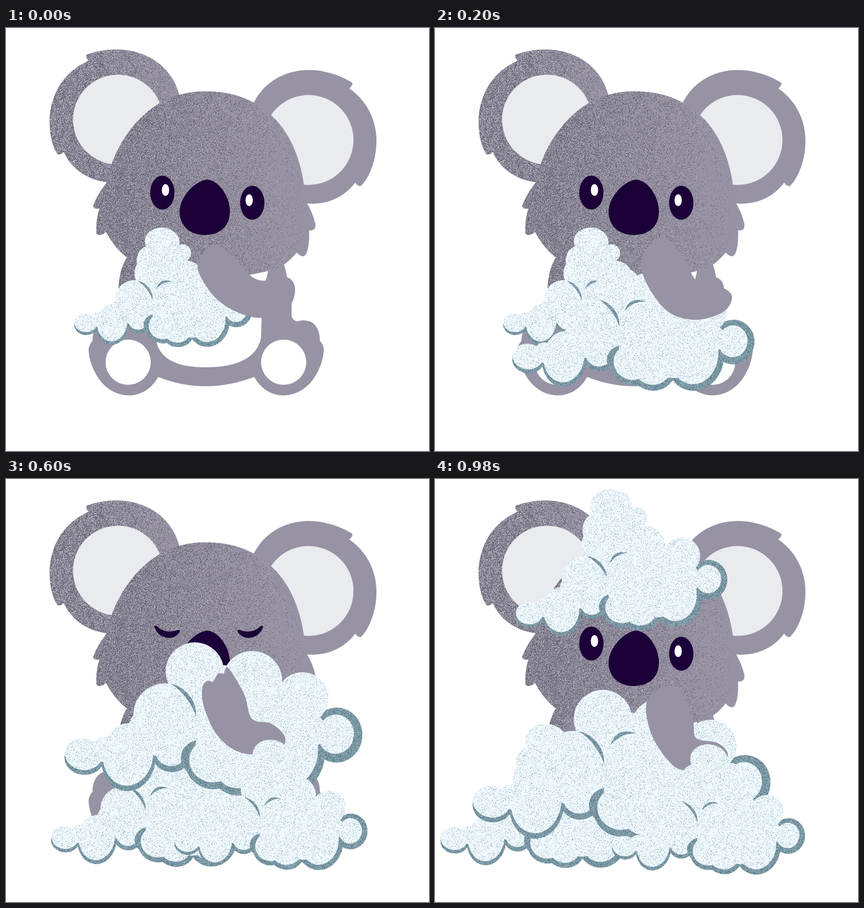
Animation, 748 px wide and 748 px high, one loop 1100 ms. Source, as an HTML page with a canvas:

```html
<!DOCTYPE html>
<html lang="en">
<head>
<meta charset="utf-8">
<title>Koala bubble bath</title>
<style>
  html, body { margin: 0; width: 100%; height: 100%; overflow: hidden; background: #fff; }
  canvas { display: block; width: 748px; height: 748px; }
</style>
</head>
<body>
<canvas id="stage" width="748" height="748"></canvas>
<script>
const SIZE = 748;
const ctx = document.getElementById('stage').getContext('2d');
const FUR = '#9793a4', INNER = '#eaebef', INK = '#1c0038', FOAM = '#eef8fd', SHADE = '#829fac';

let seed = 20417;
function rand() {
  seed = (seed + 0x6d2b79f5) | 0;
  let t = Math.imul(seed ^ (seed >>> 15), 1 | seed);
  t = (t + Math.imul(t ^ (t >>> 7), 61 | t)) ^ t;
  return ((t ^ (t >>> 14)) >>> 0) / 4294967296;
}

// density(x, y) is the share of dark dots; light dots follow at lightShare of it.
function makeGrain(density, dark, light, lightShare) {
  const sheet = document.createElement('canvas');
  sheet.width = sheet.height = SIZE;
  const g = sheet.getContext('2d');
  const img = g.createImageData(SIZE, SIZE);
  for (let i = 0; i < SIZE * SIZE; i++) {
    const p = density(i % SIZE, Math.floor(i / SIZE)), r = rand();
    const dot = r < p ? dark : r > 1 - p * lightShare ? light : null;
    if (dot) img.data.set(dot, i * 4);
  }
  g.putImageData(img, 0, 0);
  return sheet;
}

// Fur speckle is densest on the left and fades out at x = end.
const furGrain = (end, width, lightShare) => makeGrain(
  (x, y) => Math.max(0, Math.min(0.45, (end - x) / width)),
  [76, 73, 86, 160], [184, 181, 195, 255], lightShare);
const grain = {
  head: furGrain(530, 720, 0.25),
  ear: furGrain(325, 380, 0.5),
  body: furGrain(265, 110, 0.25),
  foam: makeGrain(() => 0.11, [138, 165, 176, 200], null, 0),
  shade: makeGrain(() => 0.32, [66, 95, 108, 150], [160, 186, 196, 255], 0.4)
};

function fill(path, color, sheet) {
  ctx.fillStyle = color;
  ctx.fill(path);
  if (!sheet) return;
  ctx.save();
  ctx.clip(path);
  ctx.setTransform(1, 0, 0, 1, 0, 0);
  ctx.drawImage(sheet, 0, 0);
  ctx.restore();
}

const shape = d => new Path2D(d);

function ovals(list) {
  const p = new Path2D();
  for (const [x, y, rx, ry = rx] of list) {
    p.moveTo(x + rx, y);
    p.ellipse(x, y, rx, ry, 0, 0, Math.PI * 2);
  }
  return p;
}

// Closed smooth curve through "x,y x,y ..." points.
function blob(text) {
  const pts = text.split(' ').map(s => s.split(',').map(Number));
  const at = i => pts[(i + pts.length) % pts.length];
  const p = new Path2D();
  p.moveTo(...pts[0]);
  pts.forEach((a, i) => {
    const b = at(i + 1), before = at(i - 1), after = at(i + 2);
    p.bezierCurveTo(
      a[0] + (b[0] - before[0]) / 6, a[1] + (b[1] - before[1]) / 6,
      b[0] - (after[0] - a[0]) / 6, b[1] - (after[1] - a[1]) / 6, b[0], b[1]);
  });
  p.closePath();
  return p;
}

function mirror(path, axis) {
  const p = new Path2D();
  p.addPath(path, new DOMMatrix([-1, 0, 0, 1, 2 * axis, 0]));
  return p;
}

const ear = shape('M110 -37C100 -90 54 -124 -3 -124Q-30 -124 -55 -115Q-58 -111 -52 -104C-94 -86 -121 -46 -121 6Q-120 42 -107 61Q-102 63 -96 57C-82 88 -52 108 -16 111L62 58Z');
const innerEar = ovals([[0, 0, 79.5]]);
const torso = shape('M216 402Q200 425 199 462L205 530L260 560L269 617Q352 650 439 617L505 510L505 487Q514 470 510 454Q506 443 497 441Q494 423 488 408Z');
const belly = shape('M250 440L464 426Q462 440 455 460L452 510L451 548Q440 600 352 600Q290 600 272 570Q264 558 266 540Z');
const foot = shape('M439 560L439 617C462 660 516 660 544 620Q561 595 562 568Q561 560 555 553Q555 528 538 519Q525 515 514 519Q507 516 505 510L470 500Z');
const sole = ovals([[491, 591, 40]]);
const head = shape('M352 112C412 111 460 136 490 178C517 216 527 262 530 306Q542 325 547 346Q549 359 536 358Q537 388 530 401Q524 408 514 397Q501 413 485 423Q430 442 368 440C300 441 240 425 213 405Q193 390 177 361Q166 369 160 364Q158 345 165 319Q156 321 154 315Q161 295 178 273Q188 222 219 181C256 133 300 112 352 112Z');
const nose = shape('M356 268C378 270 396 300 396 324C396 352 377 366 351 366C324 366 307 349 307 324C307 299 335 269 356 268Z');
const lid = shape('M262 261Q265 257 270 263Q284 274 304 267Q309 266 307 271Q300 281 288 281Q269 280 262 261Z');

const arms = {
  low: blob('372,383 349,398 340,430 378,484 440,512 492,500 511,463 497,441 464,447 435,440 400,403'),
  mid: blob('404,370 367,402 371,445 410,500 460,516 510,502 525,474 502,456 465,450 440,410'),
  high: blob('422,366 385,379 373,404 383,452 410,495 440,515 500,507 518,487 500,467 462,458 456,425 438,380'),
  face: blob('393,334 385,344 375,344 366,358 356,357 347,370 350,403 370,448 400,477 435,487 480,481 494,458 470,433 435,424 421,380')
};

// Puffs along the lower edge carry a dark rim; the others are plain fill.
const edge = [[167, 237, 24, 20], [192, 228, 16], [223, 231, 32, 40], [277, 222, 20, 18],
  [425, 205, 38, 46], [483, 177, 23, 25]];
const crown = [[264, 176, 40], [275, 195, 55, 36], [320, 185, 70, 48], [390, 175, 75, 55],
  [296, 117, 37], [370, 121, 38], [330, 145, 60, 40], [436, 136, 33], [455, 176, 14, 20]];
const tower = [[311, 48, 37, 30], [356, 68, 19], [286, 90, 25, 30], [325, 82, 42, 40]];
const front = [[331, 227, 30, 28], [363, 234, 28, 25]];

// The rim widens from left to right while its drop shrinks.
function rim([x, y, rx, ry = rx]) {
  const u = (x - 166) / 318, grow = 1 + 9 * u;
  return [x + 1, y + 5 - 4 * u, rx + grow, ry + grow];
}
const foam = {
  under: ovals([...edge, ...front].map(rim)),
  flat: ovals([...edge, ...crown]),
  tall: ovals([...edge, ...crown, ...tower]),
  notch: ovals([[321, 226, 31, 25]]),
  front: ovals([...front, [352, 205, 45, 35], [390, 215, 40, 30]]),
  creases: shape('M268 136A41 41 0 0 1 304 174Q292 149 268 136ZM309 149Q315 124 341 131Q322 131 309 149Z')
};

// x, y place the leftmost puff.
function cloud([x, y, scale, turn, kind]) {
  ctx.save();
  ctx.translate(x, y);
  ctx.rotate(turn * Math.PI / 180);
  ctx.scale(scale, scale);
  ctx.translate(-166, -238);
  fill(foam.under, SHADE, grain.shade);
  fill(foam[kind], FOAM, grain.foam);
  fill(foam.notch, SHADE, grain.shade);
  fill(foam.front, FOAM, grain.foam);
  fill(foam.creases, SHADE, grain.shade);
  ctx.restore();
}

const lap = (x, y) => [x, y, 1.13, 6.5, 'flat'];
const left = (x, y) => [x, y, 1, 6, 'tall'];
const right = (x, y) => [x, y, 0.9, 7, 'tall'];
const big = (x, y) => [x, y, 1.39, 6.2, 'flat'];
const first = [140, 522, 0.83, 6, 'tall'];
const hat = [166, 238, 1, 0, 'tall'];
const poses = [
  { back: [first], arm: arms.low, top: [] },
  { back: [first, lap(163, 582)], arm: arms.mid, top: [] },
  { back: [first, lap(111, 618)], arm: arms.high, top: [right(321, 626)] },
  { back: [left(103, 635), big(136, 488)], arm: arms.face, top: [right(319, 642)], asleep: true },
  { back: [left(33, 637), big(99, 572)], arm: arms.high, top: [right(334, 650), hat] }
];

function drawEar(x, y, flip, turn, sheet) {
  ctx.save();
  ctx.translate(x, y);
  ctx.rotate(turn * Math.PI / 180);
  ctx.scale(flip, 1);
  fill(ear, FUR, sheet);
  fill(innerEar, INNER);
  ctx.restore();
}

function drawEye(side) {
  const x = 356 + 79.5 * side, y = 300 + 9 * side;
  fill(ovals([[x, y, 21.5, 30]]), INK);
  fill(ovals([[x - 5.5 * side, y - 4.5, 6.5, 10.5]]), '#fff');
}

function draw(pose) {
  ctx.fillStyle = '#fff';
  ctx.fillRect(0, 0, SIZE, SIZE);
  drawEar(198, 162, 1, 0, grain.ear);
  drawEar(535, 198, -1, 11.7);
  fill(torso, FUR, grain.body);
  fill(foot, FUR);
  fill(mirror(foot, 354), FUR);
  fill(belly, '#fff');
  fill(sole, '#fff');
  fill(mirror(sole, 353.5), '#fff');
  fill(head, FUR, grain.head);
  if (pose.asleep) {
    fill(lid, INK);
    fill(mirror(lid, 358.5), INK);
  } else {
    drawEye(-1);
    drawEye(1);
  }
  fill(nose, INK);
  pose.back.forEach(cloud);
  fill(pose.arm, FUR);
  pose.top.forEach(cloud);
}

// Each pose holds for 200 ms; the last one stays until the loop ends.
const start = performance.now();
let shown = null;
function tick() {
  const t = (performance.now() - start) % 1100;
  const pose = poses[Math.min(4, Math.floor(t / 200))];
  if (pose !== shown) draw(shown = pose);
  requestAnimationFrame(tick);
}
tick();
</script>
</body>
</html>
```
